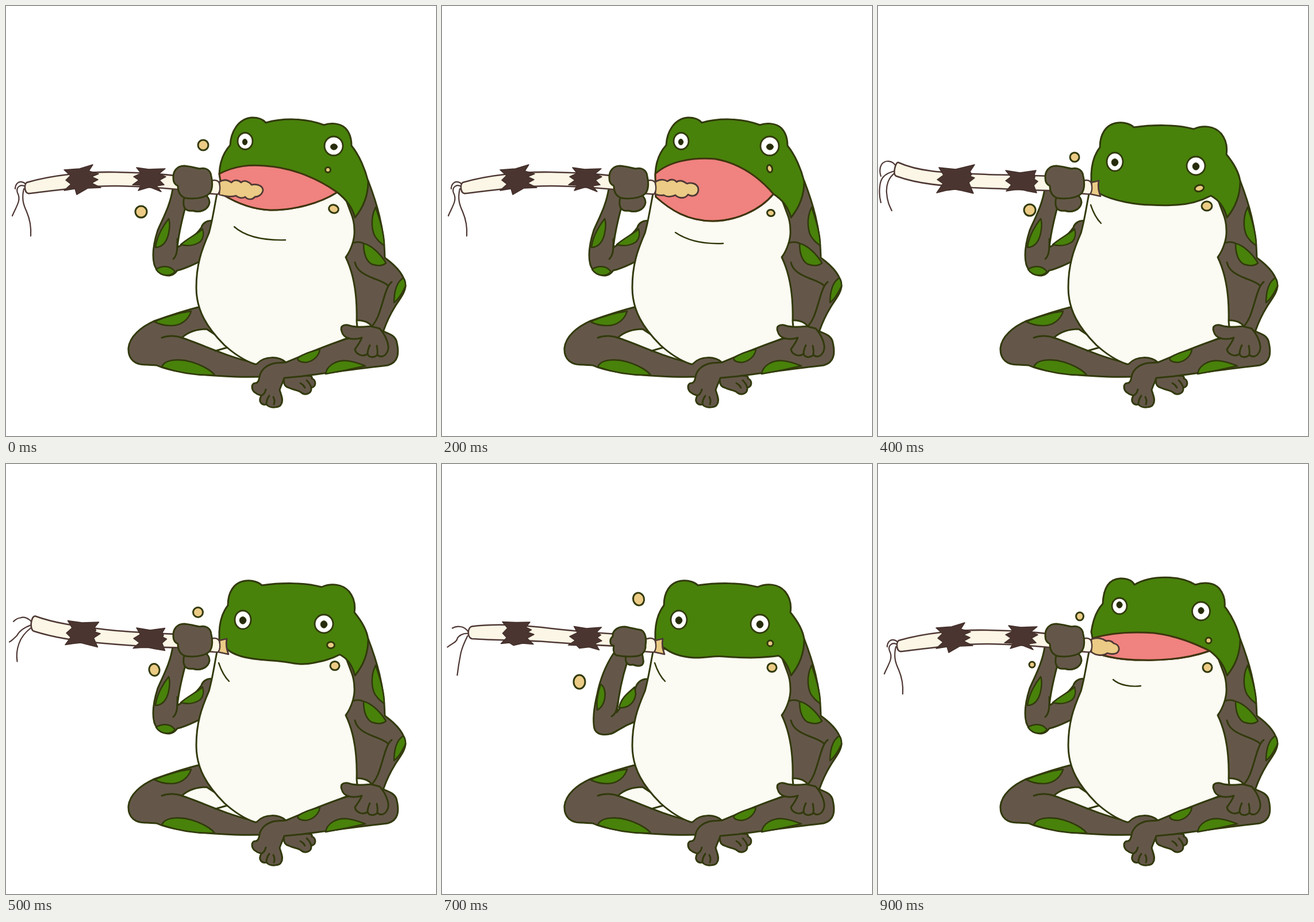
These frames come from a looping animation (748 by 748 pixels, 1000 ms). An HTML page:

```html
<!DOCTYPE html>
<html lang="en">
<head>
<meta charset="utf-8">
<title>Frog snack</title>
<style>
html, body { margin: 0; width: 100%; height: 100%; overflow: hidden; background: #fff; }
svg { display: block; width: 100vw; height: 100vh; }
path, ellipse { stroke-linecap: round; stroke-linejoin: round; }
</style>
</head>
<body>
<svg id="stage" viewBox="0 0 748 748"></svg>
<script>
const GREEN = '#48820a', BROWN = '#645749', CREAM = '#fcfbf3', PINK = '#f0827f';
const CRUMB = '#ebcb85', INK = '#323a0c', BARK = '#4f3935', STICK = '#fcf6e6';

const shape = (d, fill = 'none', ink = INK, w = 3) =>
  `<path d="${d}" fill="${fill}" stroke="${ink}" stroke-width="${w}"/>`;
const oval = (x, y, rx, ry, fill, turn = 0, w = 3) =>
  `<ellipse cx="${x}" cy="${y}" rx="${rx}" ry="${ry}" fill="${fill}" stroke="${INK}" stroke-width="${w}" transform="rotate(${turn} ${x} ${y})"/>`;
const spots = list => list.map(d => shape(d, GREEN, INK, 2.6)).join('');

// Blend two paths that share the same commands
const mix = (a, b, k = 0.5) => {
  const to = b.match(/[\d.]+/g);
  let i = 0;
  return a.replace(/[\d.]+/g, v => +v + (to[i++] - v) * k);
};
const mixAll = (a, b) => Object.fromEntries(Object.keys(a).map(key => [key, mix(a[key], b[key])]));

const back =
  shape('M600 300L630 304C645 343 658 385 659 438C680 453 694 470 695 487C694 500 683 512 676 524C668 537 662 550 657 564L636 580L590 570L580 420Z', BROWN) +
  spots([
    'M643 350C633 370 636 395 645 405C650 412 656 415 658 417C658 395 650 370 643 350Z',
    'M622 413C636 416 652 432 661 447C655 453 645 452 636 449C626 443 622 430 622 413Z',
    'M691 473C680 480 675 495 675 516C683 510 690 498 695 487C695 480 693 475 691 473Z'
  ]) +
  shape('M602 413C608 410 616 410 622 413M607 446C610 460 622 467 640 474C650 478 659 481 664 486M671 480C660 488 657 515 647 540C643 550 640 553 636 558') +
  shape('M600 548C616 545 630 548 636 557L610 566Z', CREAM);

const farLeg =
  shape('M338 523C310 530 280 540 258 548C235 558 215 575 213 595C212 615 225 625 245 624L262 625C290 638 340 642 380 644C410 646 440 645 447 645L475 620L437 621L360 560Z', BROWN) +
  spots([
    'M258 549C280 540 305 533 322 531C318 545 305 556 288 556C275 556 265 553 258 549Z',
    'M271 628C276 613 305 614 322 619C342 625 357 634 363 642C330 643 300 638 271 628Z'
  ]) +
  shape('M306 577C318 566 335 562 349 562L440 622C395 615 345 590 306 577Z', CREAM) +
  shape('M271 577C284 572 298 574 306 577M364 600L385 594');

const belly = shape('M368 322C363 345 360 370 353 395C340 425 331 450 331 490C331 530 350 560 380 590C400 608 415 617 433 623L487 622L612 570L610 548C611 510 607 470 591 437C600 425 607 405 606 390C606 380 605 372 600 360L585 320Z', CREAM);

const nearLeg =
  shape('M484 645C482 655 484 662 492 664C500 668 508 668 513 672C520 678 532 675 531 664C540 663 540 650 532 648C534 642 525 643 518 643Z', BROWN) +
  shape('M512 656C516 658 519 662 520 664M523 651C527 655 530 659 531 664') +
  shape('M437 622C450 608 475 609 487 620L475 645L440 644Z', BROWN, BROWN, 1) +
  shape('M437 622C450 608 475 609 487 620') +
  shape('M441 645C443 632 455 623 470 621L487 620C520 606 555 591 592 579L657 566C665 570 675 572 679 582C685 605 682 620 664 625C620 630 560 638 515 644L484 647C482 654 478 661 476 668C478 675 483 685 479 692C476 700 458 700 453 693C445 695 438 688 444 678C443 676 438 677 434 673C426 668 426 656 434 656C438 656 440 652 441 645Z', BROWN) +
  shape('M444 678C448 676 451 672 452 667M453 693C453 687 455 682 458 678M466 693C468 688 467 684 465 680') +
  spots([
    'M507 613C515 606 530 601 546 597C545 608 535 618 522 620C515 620 508 618 507 613Z',
    'M556 640C558 625 575 616 592 617C605 618 615 622 625 626C600 632 580 636 556 640Z'
  ]) +
  shape('M584 566C580 556 589 553 598 556C610 560 625 558 634 557L650 561C660 572 668 590 664 600C660 610 652 612 646 607C640 613 630 611 629 605C620 612 608 605 607 597C612 590 616 585 619 577C604 582 587 579 584 566Z', BROWN) +
  shape('M629 605C629 598 631 594 633 590M646 607C647 600 646 596 645 591');

const arms = {
  low: {
    limb: shape('M290 318C286 345 275 365 264 390C256 415 254 435 258 450C262 462 272 469 284 469C291 468 295 464 298 460C312 457 325 450 336 445L364 380L359 374C350 372 342 378 340 385C330 400 315 410 298 420C300 400 304 380 312 350L310 318Z', BROWN) +
      shape('M298 405C298 420 299 432 291 440') +
      spots([
        'M283 370C275 380 262 400 260 420C272 420 280 410 283 395C285 385 285 375 283 370Z',
        'M304 415C315 405 330 398 342 388C345 398 343 404 338 410C328 417 315 418 304 415Z',
        'M261 458C270 452 285 450 294 462C288 470 270 472 261 458Z'
      ]),
    fist: shape('M310 333C306 350 312 358 325 356C335 360 352 356 354 342C354 336 352 333 348 329Z', BROWN) +
      shape('M291 300C290 288 297 278 310 278C322 279 330 282 337 283C348 280 356 286 357 296C359 305 360 318 354 326C345 335 325 336 312 334C300 330 299 318 299 313C293 310 291 305 291 300Z', BROWN)
  },
  high: {
    limb: shape('M298 330C285 350 275 375 270 400C264 425 262 445 265 460C268 470 280 473 295 469C305 465 312 457 336 448L364 380L359 374C345 373 338 382 336 392C328 405 312 420 304 432C308 395 314 370 322 345L320 325Z', BROWN) +
      shape('M306 415C304 428 302 435 295 439') +
      spots([
        'M276 383C288 390 286 420 270 428C268 412 271 397 276 383Z',
        'M335 388C325 398 312 405 308 424C325 425 335 415 337 400Z'
      ]),
    fist: shape('M320 334C318 345 322 351 332 349C345 354 352 350 350 340L348 328Z', BROWN) +
      shape('M297 300C296 290 305 283 318 283C330 285 340 288 347 289C354 293 356 305 354 315C355 325 348 333 340 334C328 336 315 335 304 333C297 330 298 320 299 316C291 315 291 305 297 300Z', BROWN)
  }
};

const sticks = {
  bent: {
    rod: 'M36 307C80 294 140 288 190 289C240 290 290 293 330 300L330 322C290 318 240 313 190 313C140 313 90 320 41 326C32 328 31 311 36 307Z',
    char1: 'M101 285L128 283L151 276L144 287L161 292L149 297L160 302L149 308L165 316L142 317L123 328L120 318L101 321L113 310L104 303L112 295Z',
    char2: 'M227 281L248 284L277 283L266 292L278 297L267 303L275 311L262 313L270 323L250 315L230 321L235 312L220 311L231 303L222 297L235 291Z',
    threads: 'M36 313C33 306 25 304 20 308C17 311 16 315 16 318M34 314C24 309 17 316 20 325C27 338 18 348 11 365M31 318C27 335 30 345 36 358C42 372 44 385 43 400'
  },
  raised: {
    rod: 'M35 272C70 288 115 290 165 292C220 295 270 293 330 298L330 322C280 321 220 318 165 316C115 313 70 310 32 296C25 294 30 272 35 272Z',
    char1: 'M106 281L135 284L168 276L160 288L163 293L160 296L168 299L158 307L166 326L145 321L134 319L118 321L102 325L113 309L103 302L114 294Z',
    char2: 'M222 286L247 290L275 286L272 293L273 297L272 301L278 305L271 312L276 325L260 322L248 319L236 320L223 322L232 311L222 304L231 297Z',
    threads: 'M32 280C26 268 12 267 6 276C2 283 3 290 5 296M29 287C10 292 4 300 3 315C2 325 3 335 5 342M30 290C18 298 14 312 15 325C16 340 20 348 24 356'
  },
  flung: {
    rod: 'M66 257C100 266 130 274 165 282C210 292 260 296 330 297L330 318C270 319 210 314 165 307C130 303 100 295 66 286C56 284 56 258 66 257Z',
    char1: 'M109 264L130 268L155 274L148 281L150 285L149 288L160 291L147 298L153 311L138 307L126 303L115 304L104 304L112 294L107 286L116 276Z',
    char2: 'M232 284L255 288L278 285L272 293L275 298L273 301L281 304L272 311L277 324L262 322L248 320L233 319L219 319L232 311L222 303L236 296Z',
    threads: 'M59 271C52 268 50 263 45 259C38 253 30 251 21 252M59 273C50 278 42 281 35 282C25 283 15 281 7 277M58 279C48 288 38 292 30 300C20 310 16 320 15 331'
  }
};
sticks.dropped = {
  ...sticks.bent,
  rod: 'M38 308C75 290 130 285 180 286C230 288 280 292 330 298L330 318C280 313 230 310 180 310C130 310 80 318 38 322C31 320 32 311 38 308Z',
  threads: 'M36 317C33 306 25 303 19 307C16 311 15 315 15 319M34 317C24 309 15 317 18 326C26 338 16 345 12 360M31 319C27 338 31 348 35 360C40 375 40 390 38 404'
};

// Skull outline, eyes [x, y, rx, ry], pupils in the same form
const heads = {
  open: {
    top: 'C372 270 378 255 390 242C391 220 403 196 428 194C440 194 448 198 452 203C480 195 520 194 553 207C563 203 580 203 590 212C600 222 601 235 601 243C615 260 625 285 630 305',
    eyes: [[416, 235, 13, 14.5], [570, 243.5, 16, 16.5]],
    pupils: [[415.5, 236.5, 4.2, 5.2], [570.5, 245, 6, 5.2]]
  },
  shut: {
    top: 'C372 270 378 256 386 246C386 225 395 205 418 203C430 202 440 206 445 211C480 206 520 206 549 214C565 207 585 208 597 222C605 232 608 245 606 258C620 275 628 290 630 305',
    eyes: [[412, 271, 14, 16], [553, 278, 16, 16]],
    pupils: [[412, 272, 5.8, 6.3], [553, 279, 5.8, 6.3]]
  },
  rising: {
    top: 'C374 270 380 255 391 243C392 218 400 200 422 199C436 199 443 204 446 210C475 193 525 193 552 210C568 205 585 206 594 217C602 227 604 238 603 248C616 264 626 287 630 305',
    eyes: [[420, 247, 13, 14], [562, 256, 15.5, 16]],
    pupils: [[420, 245, 5, 5.5], [562, 255, 5, 5.5]]
  }
};

const mouths = {
  half: { upper: 'M371 292C400 277 425 276 450 278C500 281 545 302', corner: '576 324', lower: 'C545 344 500 355 460 355C430 354 400 342 377 328' },
  wide: { upper: 'M371 292C395 270 435 263 475 266C520 274 552 298', corner: '573 322', lower: 'C545 349 500 360 462 358C425 355 395 345 373 330' },
  gape: { upper: 'M371 292C395 270 435 263 475 266C520 274 555 302', corner: '580 332', lower: 'C560 363 520 388 480 390C430 393 400 365 371 334' },
  slit: { upper: 'M374 303C410 292 450 292 480 294C520 299 550 312', corner: '577 325', lower: 'C540 338 500 342 460 341C430 341 400 337 378 328' },
  shut: { corner: '579 330', lower: 'C560 340 540 345 520 346C505 347 490 347 475 346C460 346 445 344 430 341C415 338 400 334 387 327L371 312' },
  chew: { corner: '582 333', lower: 'C570 340 560 341 550 346C538 351 525 350 512 345C490 338 470 340 450 339C425 338 400 335 387 321L371 312' },
  curl: { corner: '589 334', lower: 'C565 332 545 332 525 328C505 323 485 322 470 325C455 328 445 336 425 335C410 333 398 325 387 319L371 312' }
};

const tips = {
  long: 'M371 306C380 300 388 302 392 305C398 300 405 302 408 306C415 301 422 306 426 309C436 306 446 310 446 320C445 331 434 332 428 328C422 336 412 335 406 329C398 333 390 332 386 329C380 330 375 329 371 327Z',
  worn: 'M371 306C380 300 388 304 392 307C398 301 405 303 409 307C415 301 424 307 427 311C438 309 447 313 447 321C445 329 438 332 433 332C428 338 420 337 416 332C411 336 403 333 400 330C390 333 382 331 371 328Z',
  stub: 'M371 305C380 301 390 303 397 308C402 306 408 309 410 312C420 314 422 324 415 329C408 332 402 330 399 329C392 334 380 334 371 327Z',
  bit: 'M371 307L384 304C382 315 384 322 387 331L369 327C372 320 372 312 371 307Z'
};

const smiles = {
  mid: 'M397 384C415 400 445 408 486 407',
  deep: 'M415 404C440 417 465 421 492 419',
  small: 'M409 375C420 385 440 388 457 386',
  side: 'M370 346C374 358 380 370 388 378'
};

const pose = (head, mouth, tip, smile, arm, stick, crumbs) => ({ head, mouth, tip, smile, arm, stick, crumbs });
const { open, shut, rising } = heads, { low, high } = arms;
const { bent, raised, flung, dropped } = sticks;

// One pose per 100 ms; crumbs are [x, y, rx, ry, turn]
const poses = [
  pose(open, mouths.half, tips.worn, smiles.mid, low, bent,
    [[343, 242, 9, 9], [235, 358, 10, 10], [560, 285, 4.5, 4.5], [570, 353, 8.5, 7, 15]]),
  pose(open, mouths.wide, tips.long, smiles.mid, low, bent,
    [[355, 275, 5.5, 5, 30], [238, 391, 8.5, 12, 8], [566, 283, 4, 6], [570, 358, 6.5, 6]]),
  pose(open, mixAll(mouths.wide, mouths.gape), tips.long, mix(smiles.mid, smiles.deep), low, bent,
    [[570, 283, 4.5, 6.5, -15], [572, 360, 6.5, 5.5, 10]]),
  pose(open, mouths.gape, tips.long, smiles.deep, low, bent,
    [[573, 283, 4.5, 7, -25], [574, 361, 6.5, 5, 15]]),
  pose(shut, mouths.shut, tips.bit, smiles.side, low, raised,
    [[342, 263, 8, 8], [264, 355, 10, 10], [559, 317, 8, 5.5, -15], [572, 348, 9, 8]]),
  pose(shut, mixAll(mouths.shut, mouths.chew), tips.bit, smiles.side, low, mixAll(raised, flung),
    [[334, 258, 8.5, 8.5], [258, 358, 9, 10.5, -10], [565, 315, 6.5, 5.5], [572, 351, 8, 7.5]]),
  pose(shut, mouths.chew, tips.bit, smiles.side, high, flung,
    [[325, 253, 9, 10, -20], [252, 362, 8, 11, -15], [570, 314, 5, 5], [571, 353, 7.5, 7]]),
  pose(shut, mixAll(mouths.chew, mouths.curl), tips.bit, smiles.side, high, mixAll(flung, dropped),
    [[342, 235, 9.5, 11, -15], [239, 379, 10, 12], [571, 312, 5, 5], [574, 354, 8, 7.5]]),
  pose(shut, mouths.curl, tips.bit, smiles.side, high, dropped,
    [[358, 217, 10, 12, -20], [226, 396, 12, 14, 10], [573, 310, 5, 5.5], [577, 356, 9, 7.5, -30]]),
  pose(rising, mouths.slit, tips.stub, smiles.small, low, bent,
    [[351, 265, 6.5, 7], [268, 349, 5, 5], [575, 307, 5, 5], [573, 354, 8, 8]])
];

const drawHead = ({ head, mouth }) =>
  shape(`M371 292${head.top}C630 330 622 350 607 368C603 352 594 338 ${mouth.corner}${mouth.lower}Z`, GREEN) +
  (mouth.upper ? shape(`${mouth.upper} ${mouth.corner}${mouth.lower}Z`, PINK, '#40350f') : '') +
  head.eyes.map(eye => oval(...eye, '#fff', 0, 2.8)).join('') +
  head.pupils.map(pupil => oval(...pupil, '#252b0b', 0, 1)).join('');

const drawStick = ({ stick, tip }) =>
  shape(stick.threads, 'none', BARK, 2.2) +
  shape(stick.rod, STICK, BARK, 2.6) +
  shape(stick.char1 + stick.char2, '#4b3530', '#432f2a', 1.5) +
  shape(tip, CRUMB, BARK, 2.8) +
  shape('M340 302L357 304C363 302 369 303 371 308C373 316 373 322 369 327C366 328 362 327 340 325Z', STICK, BARK, 2.4);

const draw = p => back + p.arm.limb + farLeg + belly + nearLeg +
  shape(p.smile, 'none', INK, 2.4) + drawHead(p) + drawStick(p) + p.arm.fist +
  p.crumbs.map(([x, y, rx, ry, turn]) => oval(x, y, rx, ry, CRUMB, turn)).join('');

const stage = document.getElementById('stage');
const pictures = poses.map(draw);
let start, shown = -1;

function tick(now) {
  start ??= now;
  const step = Math.floor((now - start) / 100) % pictures.length;
  if (step !== shown) stage.innerHTML = pictures[shown = step];
  requestAnimationFrame(tick);
}
stage.innerHTML = pictures[0];
requestAnimationFrame(tick);
</script>
</body>
</html>
```
